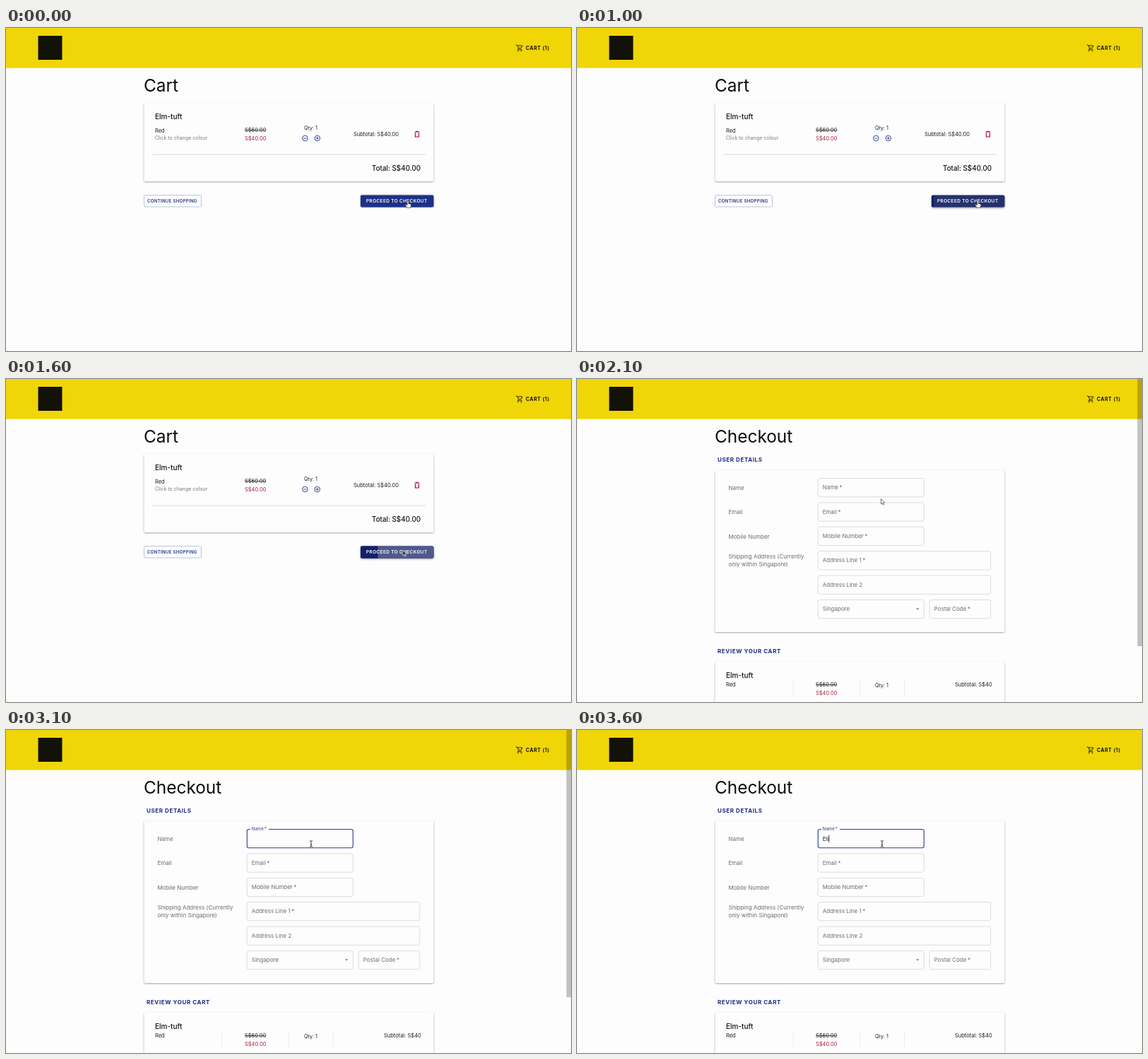
An HTML page that plays this animation: 800 by 457 pixels, repeating every 3700 ms.

```html
<!DOCTYPE html>
<html lang="en">
<head>
<meta charset="utf-8">
<title>Checkout</title>
<style>
  html, body { margin: 0; width: 100%; height: 100%; overflow: hidden; background: #fdfdfe; }
  svg { display: block; width: 800px; height: 457px; font: 7.5px Inter, "Open Sans", sans-serif; fill: #1d1d1f; }
  .title { font-size: 24.4px; fill: #0c0c0e; }
  .item { font-size: 10px; font-weight: 500; fill: #111; }
  .total { font-size: 9.8px; font-weight: 500; fill: #111; }
  .caption { font-size: 7px; fill: #77777a; }
  .old { text-decoration: line-through; }
  .price, .error { fill: #b01c34; }
  .section { font-size: 8px; font-weight: 700; letter-spacing: .6px; fill: #1a2f80; }
  .label { font-size: 8px; fill: #6c6c70; }
  .error { font-size: 6.12px; }
  .btn { font-size: 6.5px; font-weight: 600; letter-spacing: .35px; }
  .nav { font-size: 7px; font-weight: 700; letter-spacing: .5px; fill: #141200; }
  .card { fill: #fdfdfe; filter: drop-shadow(0 1px 1.2px rgba(0,0,0,.36)); }
  .field { fill: none; stroke: #dcdcdf; }
  .rule { stroke: #d9d9dc; }
  .thin { stroke: #ececef; }
  .icon { fill: none; stroke: #1c3087; }
</style>
</head>
<body>
<svg viewBox="0 0 800 457">
  <defs><clipPath id="buttonClip"><rect x="502" y="236.5" width="103.5" height="17" rx="2"/></clipPath></defs>

  <rect width="800" height="56.6" fill="#f0d606"/>
  <rect x="45.5" y="11" width="34" height="34" fill="#131208"/>
  <g fill="none" stroke="#141200" stroke-width=".9">
    <path d="M722 24h1.6l2.2 4.6h3.6l1.7-3.6h-6.8M725.8 28.6l-1.3 2h6"/>
    <circle cx="725" cy="32.4" r=".5"/><circle cx="729.7" cy="32.4" r=".5"/>
  </g>
  <text class="nav" x="736" y="30.8">CART (1)</text>

  <g id="cart">
    <text class="title" x="195" y="90">Cart</text>
    <rect class="card" x="195.5" y="106" width="410" height="111" rx="2"/>
    <text class="item" x="211" y="128.5">Elm-tuft</text>
    <text x="211" y="148">Red</text>
    <text class="caption" x="211" y="158">Click to change colour</text>
    <text class="old" x="338" y="147">S$60.00</text>
    <text class="price" x="338" y="158.5">S$40.00</text>
    <text x="422" y="144" font-size="7.2">Qty: 1</text>
    <path class="icon" stroke-width=".9" d="M421.4 156h4M438.8 156h4M440.8 154v4"/>
    <circle class="icon" stroke-width=".9" cx="423.4" cy="156" r="3.8"/>
    <circle class="icon" stroke-width=".9" cx="440.8" cy="156" r="3.8"/>
    <text x="492" y="153">Subtotal: S$40.00</text>
    <path d="M578.5 147h7M580.5 146.2h3M579.5 148.2v5.8h5v-5.8" fill="none" stroke="#b00020" stroke-width="1.1"/>
    <path class="rule" d="M207 179H594"/>
    <text class="total" x="518" y="201.5">Total: S$40.00</text>
    <rect x="195.5" y="236.5" width="81" height="16.5" rx="2" fill="none" stroke="#b5bdd8" stroke-width=".9"/>
    <text class="btn" x="200" y="247" fill="#1c3087" style="font-size:6px">CONTINUE SHOPPING</text>

    <rect id="button" x="502" y="236.5" width="103.5" height="17" rx="2"/>
    <g clip-path="url(#buttonClip)">
      <circle id="ripple" cx="567" cy="245" fill="#fff"/>
      <g id="progress">
        <rect x="502" y="236" width="104" height="18" fill="#4f598d"/>
        <rect id="bar" x="502" y="236" height="18" fill="#12206a"/>
      </g>
    </g>
    <text class="btn" x="510" y="247.3" fill="#fff">PROCEED TO CHECKOUT</text>
  </g>

  <g id="checkout">
    <text class="title" x="195" y="90">Checkout</text>
    <text class="section" x="199" y="116.5">USER DETAILS</text>
    <rect id="form" class="card" x="195.5" y="128.5" width="410" rx="2"/>
    <text id="nameLabel" class="label" x="214.5">Name</text>
    <rect id="nameBox" class="field" x="341.3" y="140.5" width="150" height="26.3" rx="2.5"/>
    <rect id="notch" x="346" y="139" height="3" fill="#fdfdfe"/>
    <text id="nameHint" class="label" x="347.8">Name&thinsp;*</text>
    <text id="typed" x="347.8" y="156.8" style="font-size:8px"></text>
    <rect id="caret" y="148.5" width=".8" height="10.5" fill="#222"/>
    <text id="error" class="error" x="347.8" y="175.3">Please enter your name (min. 3 characters).</text>
    <g id="below">
      <g id="fields"></g>
      <path d="M480 324.3h4.4l-2.2 2.2z" fill="#77777a"/>
      <text class="section" x="199" y="387.7">REVIEW YOUR CART</text>
      <rect class="card" x="195.5" y="400" width="410" height="90" rx="2"/>
      <text class="item" x="211" y="422.5">Elm-tuft</text>
      <text x="211" y="435">Red</text>
      <text class="old" x="338" y="435">S$60.00</text>
      <text class="price" x="338" y="446.5">S$40.00</text>
      <text x="422" y="435.5" font-size="7.2">Qty: 1</text>
      <text x="535" y="435">Subtotal: S$40</text>
      <path class="thin" d="M306 427v21M400.5 427v21M463.5 427v21"/>
    </g>
    <rect id="scrollbar" x="793.5" width="6.5" height="378" fill="#000" opacity=".24"/>
  </g>

  <g id="pointer" stroke-linejoin="round">
    <path id="hand" fill="#fff" stroke="#222" stroke-width=".6"
      d="M-.9 .6Q0-.5 .9 .6V4L3.6 4.5Q4.7 5 4.5 6.5L3.6 9.8H-1.2L-3.6 6Q-3.5 4.9-2.4 5.4L-.9 6.6Z"/>
    <path id="arrow" d="M0 0V7.4L1.7 5.9L2.9 8.6L4.1 8.1L2.9 5.4H5.2Z" stroke-width=".7"/>
    <path id="beam" fill="none" stroke="#222" stroke-width=".9" d="M-2-4Q0-4 0-3Q0-4 2-4M0-3V3.5M-2 4.5Q0 4.5 0 3.5Q0 4.5 2 4.5M-1 1.5H1"/>
  </g>
</svg>

<script>
const LOOP = 3700, STEP = 100;
const CHECKOUT = 1700, FOCUS = 2400, TYPING = 3300;
const LETTERS = [[TYPING, "E"], [3400, "El"], [3600, "Eli"]];
const PATH = [[0, 569, 244.5], [700, 568, 244.5], [1200, 567, 244], [1500, 565, 244],
              [1800, 556, 239], [2100, 430.5, 169.5], [2300, 432, 160.7]];

const $ = id => document.getElementById(id);
const set = (id, attrs) => { for (const k in attrs) $(id).setAttribute(k, attrs[k]); };
const show = (id, on) => $(id).style.display = on ? "" : "none";
const clamp = v => Math.max(0, Math.min(1, v));
const ease = v => v * v * (3 - 2 * v);
const phase = (t, start, length) => clamp((t - start) / length);
const mix = (a, b, k) => a + (b - a) * k;

const label = (x, y, text) => `<text class="label" x="${x}" y="${y}">${text}</text>`;
const field = (x, y, width, hint) =>
  `<rect class="field" x="${x}" y="${y}" width="${width}" height="26.3" rx="2.5"/>` +
  label(x + 6.5, y + 15.6, hint.replace(" *", "&thinsp;*"));

$("fields").innerHTML =
  label(214.5, 191, "Email") + field(341.3, 174.9, 150, "Email *") +
  label(214.5, 225.5, "Mobile Number") + field(341.3, 209.2, 150, "Mobile Number *") +
  label(214.5, 254, "Shipping Address (Currently") + label(214.5, 265, "only within Singapore)") +
  field(341.3, 243.5, 244.5, "Address Line 1 *") + field(341.3, 278, 244.5, "Address Line 2") +
  field(341.3, 312.4, 150, "Singapore") + field(499.3, 312.4, 86.5, "Postal Code *");

function drawButton(t) {
  const hover = ease(phase(t, 50, 300));
  const rgb = [[28, 17], [48, 32], [135, 98]].map(([a, b]) => mix(a, b, hover));
  set("button", { fill: `rgb(${rgb})` });
  $("button").style.filter = `drop-shadow(0 ${mix(.8, 1.6, hover)}px ${mix(.8, 1.8, hover)}px rgba(0,0,0,.45))`;
  set("ripple", {
    r: 68 * ease(phase(t, 550, 550)),
    opacity: t < 600 ? 0 : .17 * (1 - phase(t, 750, 450))
  });
  show("progress", t >= 1450);
  set("bar", { width: 104 * 2.2 * phase(t, 1465, 1260) });
}

function drawForm(t) {
  const focused = t >= FOCUS;
  const text = LETTERS.reduce((last, [start, s]) => t >= start ? s : last, "");
  const invalid = text.length > 0 && text.length < 3;
  const shift = invalid ? 11.3 : 0;
  const lift = ease(phase(t, FOCUS - 50, 200));
  const accent = invalid ? "#b01c34" : "#2c3d8a";

  set("form", { height: 229.5 + shift });
  set("below", { transform: `translate(0 ${shift})` });
  set("nameLabel", { y: 156.7 + shift / 2 });
  set("nameBox", {
    style: focused ? `stroke:${accent};stroke-width:1.1` : ""
  });
  set("notch", { width: 26 * lift });
  set("nameHint", {
    y: mix(156.1, 142.2, lift),
    style: `font-size:${mix(8, 6.1, lift)}px;` + (focused ? `fill:${accent}` : "")
  });
  $("typed").textContent = text;
  show("error", invalid);
  set("caret", {
    x: 347.8 + (text ? $("typed").getComputedTextLength() : 0),
    opacity: !focused ? 0 : text ? 1 : 1 - phase(t, 2800, 300)
  });
  show("scrollbar", t < TYPING);
}

function drawPointer(t) {
  const next = PATH.findIndex(p => p[0] > t);
  const b = PATH[next < 0 ? PATH.length - 1 : next];
  const a = next < 0 ? b : PATH[next - 1];
  const k = a === b ? 0 : phase(t, a[0], b[0] - a[0]);
  set("pointer", { transform: `translate(${mix(a[1], b[1], k)} ${mix(a[2], b[2], k)})` });
  show("hand", t < 1450);
  show("arrow", t >= 1450 && t < 2200);
  show("beam", t >= 2200);
  set("arrow", t < CHECKOUT ? { fill: "#111", stroke: "#fff" } : { fill: "#fff", stroke: "#444" });
}

function draw(now) {
  const t = Math.floor(now % LOOP / STEP) * STEP;
  show("cart", t < CHECKOUT);
  show("checkout", t >= CHECKOUT);
  drawButton(t);
  drawForm(t);
  drawPointer(t);
  requestAnimationFrame(draw);
}
draw(0);
</script>
</body>
</html>
```
